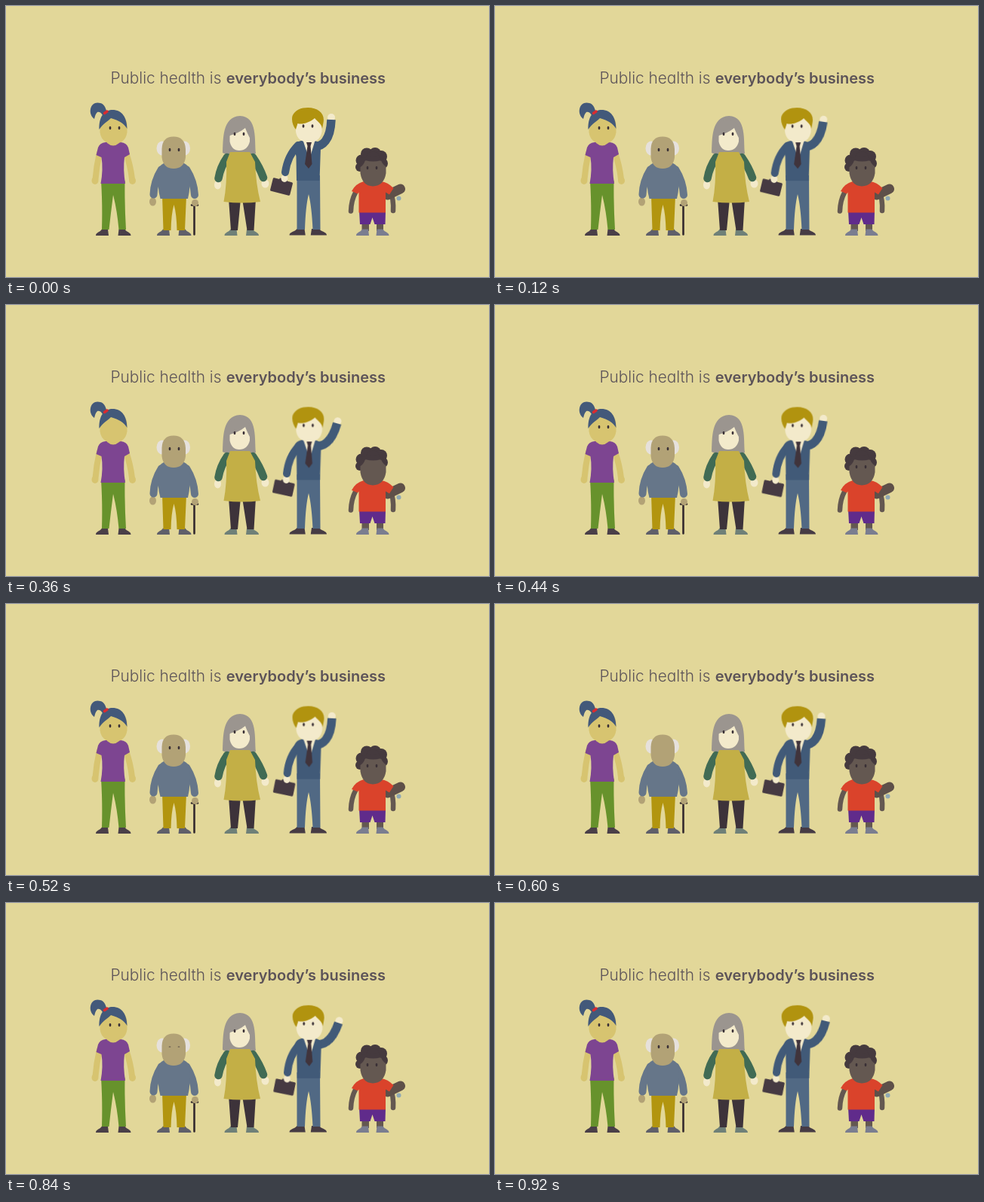
Recreate the animation shown at these times as an HTML page. Size 640x360 px, loop 960 ms.

```html
<!DOCTYPE html>
<html lang="en">
<head>
<meta charset="utf-8">
<title>Public health</title>
<style>
  html, body { margin: 0; width: 100%; height: 100%; overflow: hidden; background: #e2d799; }
  svg { display: block; width: 100vw; height: 100vh; }
  text { font-family: Inter, "Open Sans", sans-serif; font-size: 20.8px; font-weight: 300; fill: #5c5358; font-feature-settings: "cv11"; }
  .bold { font-size: 20px; font-weight: 600; text-anchor: end; }
  .limb { fill: none; stroke-linecap: round; stroke-linejoin: round; }
  .eyes { fill: #3a3036; }
  .tan { --skin: #d7c470; }
  .brown { --skin: #b2a276; }
  .cream { --skin: #f3eacb; }
  .dark { --skin: #645851; }
  .skin { fill: var(--skin); }
  .arm { stroke: var(--skin); }

  .wave, .carry, .drift, .blink { animation: 960ms linear infinite; }
  .wave { transform-origin: 410px 185px; animation-name: wave; }
  .carry { transform-origin: 383px 186px; animation-name: carry; }
  .drift { animation-name: drift; }
  .blink { animation-timing-function: step-end; }
  .blink.girl { animation-name: blink-girl; transform-origin: 144px 162px; }
  .blink.elder { animation-name: blink-elder; transform-origin: 223px 191px; }
  .blink.boy { animation-name: blink-boy; }

  @keyframes wave {
    0%, 57.3% { transform: rotate(0deg); animation-timing-function: cubic-bezier(.37, 0, .63, 1); }
    29.2% { transform: rotate(17deg); animation-timing-function: cubic-bezier(.37, 0, .63, 1); }
    85.4% { transform: rotate(17deg); animation-timing-function: cubic-bezier(.12, 0, .39, 0); }
    100% { transform: rotate(8deg); }
  }
  @keyframes carry {
    0% { transform: none; animation-timing-function: cubic-bezier(.3, .4, .6, 1); }
    72%, 100% { transform: translate(.5px, 3px) rotate(-3deg); }
  }
  @keyframes drift {
    0% { transform: none; }
    70%, 100% { transform: translate(.7px, .8px); }
  }
  @keyframes blink-girl {
    0%, 45.8% { opacity: 1; transform: none; }
    16.6% { opacity: .4; transform: scaleY(.35); }
    25% { opacity: 0; }
  }
  @keyframes blink-elder {
    0%, 91.6% { opacity: 1; transform: none; }
    62.5% { opacity: 0; }
    83.3% { opacity: .5; transform: scaleY(.4); }
  }
  @keyframes blink-boy {
    0%, 45.8% { opacity: 1; }
    16.6% { opacity: 0; }
  }
</style>
</head>
<body>
<svg viewBox="0 0 640 360">
  <defs>
    <path id="shoe" d="M0 8.500C0 4 6 4 8 0H16L17 8.500Z"/>
    <g id="pair"><ellipse cx="-6" rx="1.400" ry="2.200"/><ellipse cx="6" rx="1.400" ry="2.200"/></g>
  </defs>
  <rect width="640" height="360" fill="#e2d799"/>

  <text x="138.500" y="103">Public health is</text>
  <text class="bold" x="503" y="103">everybody’s business</text>

  <!-- young woman -->
  <g class="tan">
    <path class="limb arm" stroke-width="8" d="M124 195Q120 212 118.500 230M159 195Q165 212 167 230"/>
    <ellipse class="skin" cx="118" cy="232" rx="4.500" ry="5"/>
    <ellipse class="skin" cx="167.500" cy="232" rx="4.500" ry="5"/>
    <g fill="#4a3f48">
      <use href="#shoe" x="119" y="296.500"/>
      <use href="#shoe" transform="translate(165.500 296.500) scale(-1 1)"/>
    </g>
    <path fill="#67922c" d="M126 232H157.500Q157 264 159 297H149.500Q147 270 142 251 139 274 136.500 297H127Q128 264 126 232Z"/>
    <path fill="#7d4591" d="M132 181H152Q160 182 162 188L164 197 157 201Q155 217 158 236H125.500Q129 217 126.500 201L119.500 198 122 188Q124 182 132 181Z"/>
    <path class="skin" d="M134 176H150V182Q142 189 134 182Z"/>
    <path class="skin" d="M124.500 157Q125 143 142 143T160.500 157V168Q158 183 142.500 183 127 183 124.500 168Z"/>
    <path fill="#43597a" d="M128 145C126 141 123 140 121 141 118 144 118 147 117 150 113 147 111 142 112 137 113 130 119 127 125 129 130 130 132 135 134 142Z"/>
    <path fill="#43597a" d="M123.500 164C123 147 130 138 141 138 154 138 160 148 160.500 163 156 156 150 152 139 149 135 153 129 156 123.500 164Z"/>
    <path class="limb" stroke="#d92b30" stroke-width="3.500" d="M130.500 142.500L134 140"/>
    <g class="eyes blink girl"><use href="#pair" x="144" y="162"/></g>
  </g>

  <!-- old man -->
  <g class="brown">
    <ellipse class="skin" cx="194.500" cy="260" rx="4.500" ry="5.500"/>
    <g fill="#5f5f6a">
      <use href="#shoe" x="200" y="296.500"/>
      <use href="#shoe" transform="translate(245.500 296.500) scale(-1 1)"/>
    </g>
    <path fill="#b2950f" d="M207 252H239L237 298H226.500Q226 276 222.500 264 219 276 218.500 298H208.500Z"/>
    <path class="limb" stroke="#33292d" stroke-width="2.600" d="M249.500 264V303.500M246 264.500H254"/>
    <ellipse class="skin" cx="250.500" cy="261.500" rx="4.500" ry="4.500"/>
    <path class="limb" stroke="#667689" stroke-width="10" d="M206 217Q196 233 195.500 250.500M239 217Q249 233 250 251"/>
    <path fill="#667689" d="M213 208H232Q241 209 243 218 245 240 241 256H204.500Q200 240 202 218 204 209 213 208Z"/>
    <g fill="#e6e1dc">
      <ellipse cx="207" cy="189" rx="7.500" ry="9.500"/>
      <ellipse cx="236.500" cy="189" rx="7.500" ry="9.500"/>
    </g>
    <path class="skin" d="M206.500 190Q207 173.500 222 173.500T238 190V201Q236 216 222 216 208.500 216 206.500 201Z"/>
    <g class="eyes blink elder"><use href="#pair" x="223" y="191"/></g>
  </g>

  <!-- woman in pinafore -->
  <g class="cream">
    <path fill="#9b958f" d="M287 195C288 178 286 147 310 146 334 147 329 179 331 196Q310 206 287 195Z"/>
    <ellipse class="skin" cx="280.500" cy="237.500" rx="4.500" ry="6"/>
    <ellipse class="skin" cx="343.500" cy="236" rx="5" ry="5.500"/>
    <g fill="#6f8078">
      <use href="#shoe" x="289.500" y="296.500"/>
      <use href="#shoe" transform="translate(335 296.500) scale(-1 1)"/>
    </g>
    <path fill="#3d333a" d="M295 256H311L307 298H298ZM313 256H331L328.500 298H319.500Z"/>
    <path class="limb" stroke="#416b54" stroke-width="10.500" d="M293 201Q284 214 281.500 229M327 201Q336 214 341 228"/>
    <path fill="#c3af46" d="M297 194H323L330 207Q331 236 337 260 313 263 288.500 260 293 236 292 207Z"/>
    <path class="skin" d="M296.500 168Q297 156 309 155.500T323 169V180Q320 192 309 192 299 192 296.500 180Z"/>
    <path fill="#9b958f" d="M290 178C289 160 297 151 311 151 323 152 326 164 325 179 322 173 319 168 317 162 311 167 303 170 297 172Z"/>
    <g class="eyes"><use href="#pair" x="309" y="170"/></g>
  </g>

  <!-- businessman -->
  <g class="cream">
    <g fill="#463b44">
      <use href="#shoe" transform="translate(375.500 296) scale(1.250 1)"/>
      <use href="#shoe" transform="translate(425 296) scale(-1.250 1)"/>
    </g>
    <g class="drift">
      <g class="carry">
        <path class="limb" stroke="#463a42" stroke-width="2" d="M362 233L363.500 229.500 372 232 371 236"/>
        <rect x="351.500" y="231" width="27" height="18" rx="1.500" fill="#463a42" transform="rotate(14 365 240)"/>
        <ellipse class="skin" cx="369" cy="229" rx="4.500" ry="5"/>
        <path class="limb" stroke="#415a78" stroke-width="10" d="M387 185Q373 199 370 221"/>
      </g>
      <g class="wave">
        <circle class="skin" cx="431" cy="148" r="5"/>
        <path fill="none" stroke="#415a78" stroke-width="11.500" d="M405 186C420 189 430 177 431 151"/>
      </g>
    </g>
    <path fill="#516984" d="M385.500 225H416L416.500 297H406.500Q405 266 401 250 397 266 396 297H385.500Z"/>
    <g class="drift">
      <path fill="#415a78" d="M391 179H409Q416 180 417 187L415.500 232H385L384.500 200 382 187Q384 180 391 179Z"/>
      <path class="skin" d="M393 177H410L402 204Z"/>
      <path fill="#40343c" d="M398 181H405L403.500 186 405.500 210 401 216 396 210 399.500 186Z"/>
      <path class="skin" d="M384 158Q386 144 402 144T418.500 158V167Q416 181 402 181 386 181 384 167Z"/>
      <path fill="#b1930f" d="M384 164C380 159 378 152 379.500 146 383 138 391 135 400 135 414 135 423 143 420.500 155L419 163C418 156 413 154 409 149 402 155 392 158 386.500 156Z"/>
      <g class="eyes"><use href="#pair" x="400" y="159.500"/></g>
    </g>
  </g>

  <!-- boy -->
  <g class="dark">
    <path class="limb arm" stroke-width="6.500" d="M463 248Q457.500 258 457 272.500M509 244Q514 258 513 272"/>
    <circle cx="520.500" cy="255.500" r="3" fill="#8fa9b4"/>
    <path class="limb" stroke="#5e5049" stroke-width="13" d="M506 251L522.500 243"/>
    <path class="skin" d="M471.500 286H481V299H471.500ZM491 286H500V299H491Z"/>
    <g fill="#7a7d90">
      <use href="#shoe" x="464" y="296.500"/>
      <use href="#shoe" transform="translate(507.500 296.500) scale(-1 1)"/>
    </g>
    <path fill="#602b8b" d="M468 272H503L502.500 290H488.500L485.500 281 482.500 290H469Z"/>
    <path fill="#da432b" d="M474 233H497Q506 234 513.500 242L508 250.500 503 247.500V274.500H467.500V247.500L466 249.500 458 246Q463 236 474 233Z"/>
    <g fill="#453a3e">
      <circle cx="471" cy="205" r="7.500"/>
      <circle cx="469" cy="214" r="6"/>
      <circle cx="478" cy="196.500" r="8"/>
      <circle cx="489" cy="196" r="8"/>
      <circle cx="497" cy="200" r="8"/>
      <circle cx="499" cy="209" r="7"/>
      <circle cx="486" cy="202" r="9"/>
    </g>
    <path class="skin" d="M469.500 213Q471 204 486 204T503.500 213V222Q501 239 486 239.500 472 239 469.500 222Z"/>
    <path fill="#453a3e" d="M468 215Q467 200 484 200 503 199 504.500 214 499 211 497 205 486 208 476 205 474 212 468 215Z"/>
    <g class="eyes blink boy"><use href="#pair" x="485" y="215"/></g>
  </g>
</svg>
</body>
</html>
```
